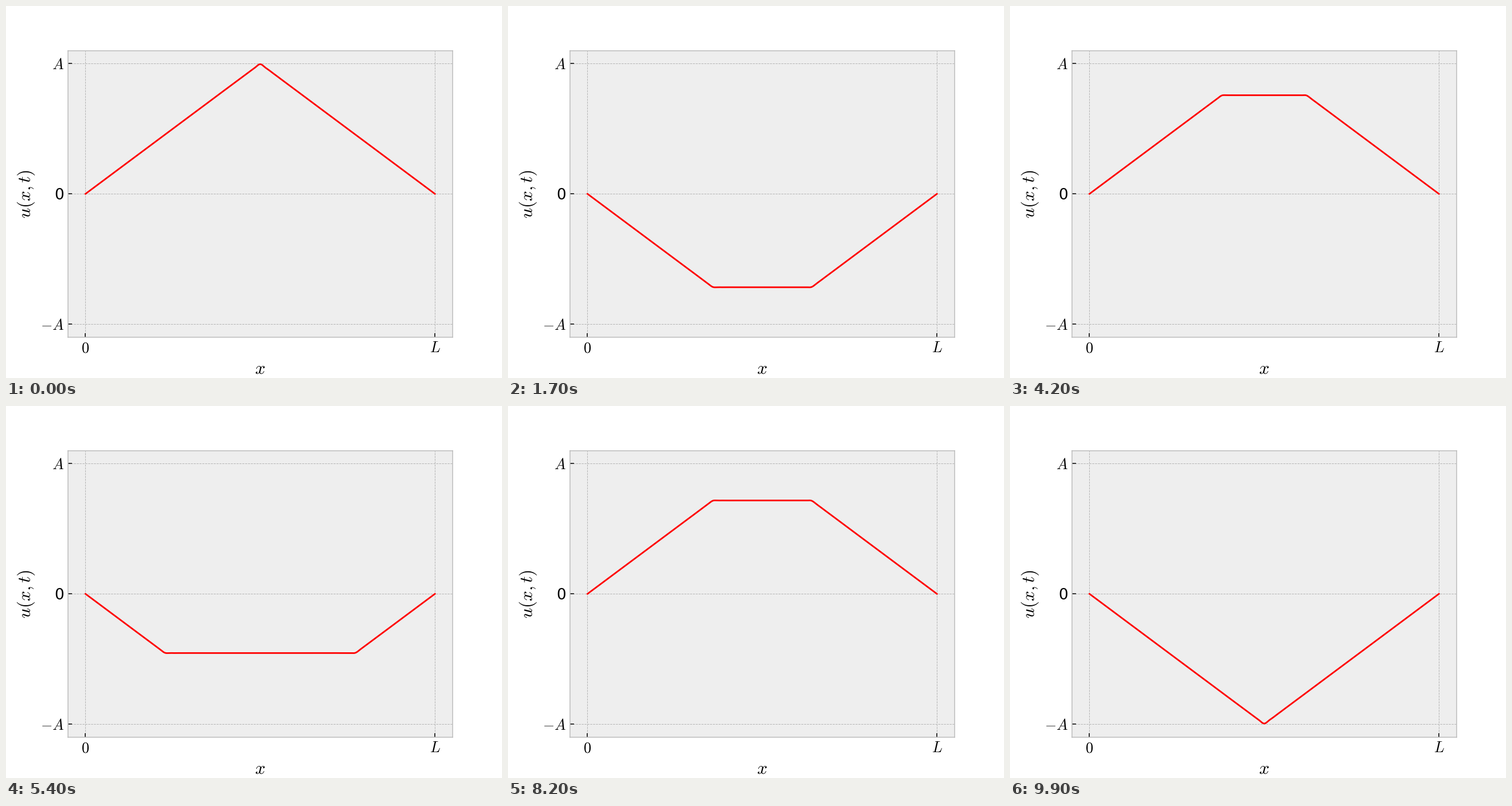
Recreate the animation shown at these times as a matplotlib script. Size 864 px wide and 648 px high, loop 10000 ms.

```python
import numpy as np
import matplotlib.pyplot as plt
from matplotlib.animation import FuncAnimation

plt.rcParams.update({
    "font.family": "DejaVu Sans",
    "font.size": 14,
    "mathtext.fontset": "cm",
    "axes.facecolor": "#eeeeee",
    "axes.edgecolor": "#bcbcbc",
    "axes.labelsize": "large",
    "axes.axisbelow": True,
    "axes.grid": True,
    "grid.color": "#b2b2b2",
    "grid.linestyle": "--",
    "grid.linewidth": 0.5,
    "xtick.direction": "in",
    "ytick.direction": "in",
})

FRAMES = 100
HALF_PERIODS = 5
TERMS = 50

# Fourier series of a string plucked at its middle, with A = L = 1
x = np.linspace(0, 1, 1000)
k = np.arange(TERMS)
m = 2 * k + 1
coef = 8 / np.pi**2 * (-1.0) ** k / m**2
modes = np.sin(np.pi * np.outer(x, m))


def displacement(frame):
    phase = HALF_PERIODS * frame / (FRAMES - 1)
    return modes @ (coef * np.cos(np.pi * m * phase))


fig, ax = plt.subplots(figsize=(6.4, 4.8), dpi=135)
line, = ax.plot(x, displacement(0), color="red", lw=1.5)
ax.set_xlim(-0.05, 1.05)
ax.set_ylim(-1.1, 1.1)
ax.set_xticks([0, 1], ["$0$", "$L$"])
ax.set_yticks([-1, 0, 1], ["$-A$", "0", "$A$"])
ax.set_xlabel("$x$")
ax.set_ylabel("$u(x,t)$")


def update(frame):
    line.set_ydata(displacement(frame))
    return line,


anim = FuncAnimation(fig, update, frames=FRAMES, interval=100,
                     repeat=True, repeat_delay=0)
plt.show()
```
